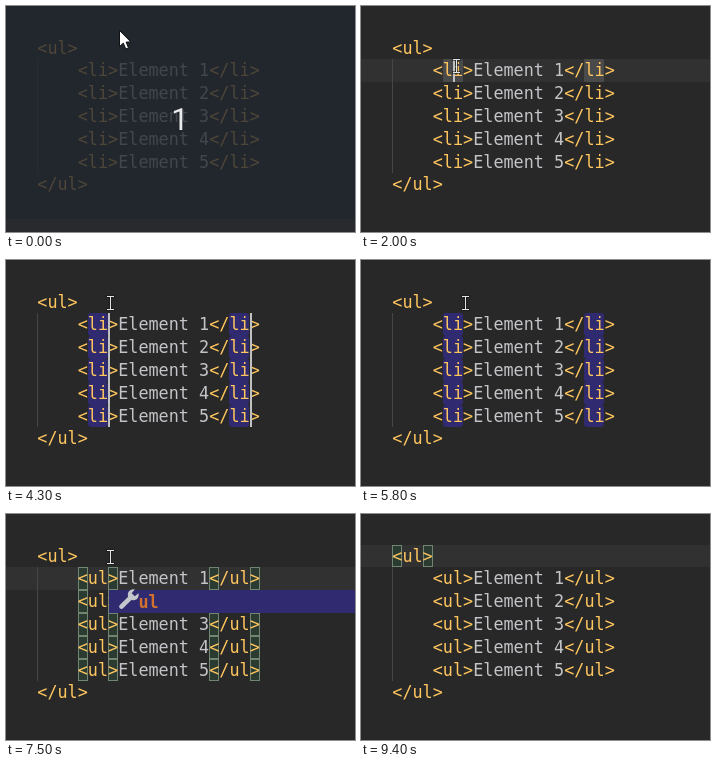
These frames come from a looping animation (349x226 px, 9700 ms). An HTML page with a canvas:

```html
<!DOCTYPE html>
<html>
<head>
<meta charset="utf-8">
<style>
html, body { margin: 0; height: 100%; overflow: hidden; background: #282828; }
canvas { display: block; }
</style>
</head>
<body>
<canvas id="stage" width="349" height="226"></canvas>
<script>
const ctx = document.getElementById('stage').getContext('2d');
const LOOP = 9700, W = 349, H = 226;
const FONT = '16.8px "DejaVu Sans Mono", monospace';
const TAG = '#ffc65f', PLAIN = '#c3c4c8', SELECTION = '#302b70';
const ITEMS = [1, 2, 3, 4, 5];

const colX = col => 31.3 + col * 10.114;
const rowY = row => Math.round(30.6 + row * 22.8);
const rowH = row => rowY(row + 1) - rowY(row);

// Mouse path: time, x, y
const PATH = [
  [0, 115.5, 28.5], [300, 115.5, 28.5], [400, 114.5, 28.5], [500, 114.5, 28.5],
  [900, 106, 45], [1000, 106, 45], [1100, 100.5, 50], [1200, 97.5, 58],
  [1300, 97.5, 61.5], [1400, 99.5, 57.5], [1500, 99.5, 57.5], [1600, 94.5, 62.5],
  [1900, 94.5, 62.5], [2700, 104.5, 43.5], [8100, 104.5, 43.5], [8200, 104.5, 42.5],
  [8300, 104.5, 43.5], [9000, 104.5, 43.5], [9300, 104.5, 16.5]
];

function mouseAt(t) {
  const i = PATH.findIndex(p => p[0] > t);
  if (i < 0) return PATH[PATH.length - 1].slice(1);
  const [t0, x0, y0] = PATH[i - 1], [t1, x1, y1] = PATH[i];
  const k = (t - t0) / (t1 - t0);
  return [x0 + (x1 - x0) * k, y0 + (y1 - y0) * k];
}

function rect(x, y, w, h, color) {
  ctx.fillStyle = color;
  ctx.fillRect(x, y, w, h);
}

function write(text, col, row, color) {
  ctx.font = FONT;
  ctx.fillStyle = color;
  ctx.fillText(text, colX(col), Math.round(47.6 + row * 22.8));
}

function mark(col, row, count, color, radius) {
  ctx.fillStyle = color;
  ctx.beginPath();
  ctx.roundRect(Math.round(colX(col)), rowY(row), Math.round(count * 10.114), rowH(row), radius);
  ctx.fill();
}

function brace(col, row) {
  const x = Math.round(colX(col)), y = rowY(row);
  rect(x, y, 10, rowH(row), '#2c3b32');
  ctx.strokeStyle = '#708671';
  ctx.lineWidth = 1;
  ctx.strokeRect(x + 0.5, y + 0.5, 9, rowH(row) - 1);
}

function caret(col, row) {
  rect(Math.round(colX(col)), rowY(row), 2, rowH(row), '#bfc0c2');
}

function wrench(x, y) {
  ctx.save();
  ctx.translate(x, y);
  ctx.rotate(Math.PI / 4);
  ctx.fillStyle = '#c4c8cc';
  ctx.beginPath();
  ctx.arc(0, -6, 5.5, -Math.PI / 2 + 0.5, Math.PI * 1.5 - 0.5);
  ctx.lineTo(-2.2, -6);
  ctx.lineTo(2.2, -6);
  ctx.fill();
  ctx.beginPath();
  ctx.roundRect(-2.3, -3, 4.6, 16, 2.3);
  ctx.fill();
  ctx.restore();
}

function option(text, typed, row) {
  wrench(123, rowY(row) + 9);
  ctx.font = 'bold ' + FONT;
  [...text].forEach((ch, i) => {
    ctx.fillStyle = i < typed ? '#d2702c' : PLAIN;
    ctx.fillText(ch, 132.5 + i * 10.114, rowY(row) + 18);
  });
}

function popup(t) {
  const x = 103, w = W - x;
  rect(x, rowY(2), w, rowH(2), SELECTION);
  if (t < 7200) {
    rect(x, rowY(3), w, rowH(3), '#3c3f41');
    option('u', 1, 2);
    option('ul', 1, 3);
  } else {
    option('ul', 2, 2);
  }
}

function beam(x, y) {
  x = Math.round(x - 0.5);
  y = Math.round(y - 0.5);
  const shape = (pad, color) => {
    rect(x - 3 - pad, y - 7 - pad, 7 + 2 * pad, 1 + 2 * pad, color);
    rect(x - 3 - pad, y + 6 - pad, 7 + 2 * pad, 1 + 2 * pad, color);
    rect(x - pad, y - 7, 1 + 2 * pad, 14, color);
  };
  shape(1, 'rgba(20,20,20,.5)');
  shape(0, '#e4e4e4');
}

function arrow(x, y) {
  const points = [[0, 0], [0, 16], [3.8, 12.6], [6.3, 18.5], [9, 17.3], [6.6, 11.6], [11.3, 11.4]];
  ctx.beginPath();
  points.forEach(([px, py]) => ctx.lineTo(x + px, y + py));
  ctx.closePath();
  ctx.fillStyle = '#fff';
  ctx.strokeStyle = '#111';
  ctx.lineWidth = 1;
  ctx.fill();
  ctx.stroke();
}

function countdown() {
  rect(0, 0, W, rowY(8), 'rgba(33,38,47,.8)');
  rect(0, rowY(8), W, H, '#292a2d');
  ctx.font = '31px Roboto, sans-serif';
  ctx.textAlign = 'center';
  ctx.fillStyle = '#e8eaec';
  ctx.fillText('1', 174, 124);
  ctx.textAlign = 'left';
}

function caretOn(t) {
  if (t < 1900) return false;
  if (t < 4300) return (t - 1900) % 1000 < 500;
  if (t < 6400) return (t - 4300) % 1000 < 500;
  if (t < 7800) return t < 7500;
  return t < 8500 || (t >= 8800 && t < 9300);
}

function draw(t) {
  const editing = t >= 6400 && t < 7800;
  const selecting = t >= 4300 && t < 6400;
  const name = t < 6400 ? 'li' : t < 6700 ? '' : t < 7000 ? 'u' : 'ul';
  const n = name.length, close = n + 15, end = close + n;
  const color = t >= 6400 && t < 6800 ? PLAIN : TAG;
  const activeRow = t < 1900 ? 8 : t < 7800 ? 1 : 0;

  rect(0, 0, W, H, '#282828');
  if (!selecting) rect(0, rowY(activeRow), W, rowH(activeRow), '#313131');
  rect(31, rowY(1), 1, rowY(6) - rowY(1), '#464646');

  if (t >= 7800) [0, 3].forEach(col => brace(col, 0));
  write('<ul>', 0, 0, TAG);
  write('</ul>', 0, 6, TAG);

  for (const row of ITEMS) {
    if (selecting) [5, 19].forEach(col => mark(col, row, 2, SELECTION, 3));
    else if (row === 1 && t >= 1900 && t < 4300) [5, 19].forEach(col => mark(col, row, 2, '#4a4a4a', 1));
    if (editing) [4, 5 + n, 13 + n + 2, end + 2].forEach(col => brace(col, row));
    const tail = editing || t >= 6400 ? n + 15 : 17;
    write('<' + name + '>', 4, row, color);
    write('Element ' + row, n + 6, row, PLAIN);
    write('</' + name + '>', tail, row, color);
  }

  if (caretOn(t)) {
    if (t < 4300) caret(6, 1);
    else if (t < 7800) ITEMS.forEach(row => [5 + n, end + 2].forEach(col => caret(col, row)));
    else caret(4, 0);
  }
  if (t >= 6800 && t < 7800) popup(t);

  if (t < 200) {
    countdown();
    arrow(113.5, 24.5);
  } else if (t < 9400) {
    beam(...mouseAt(t));
  }
}

function frame(now) {
  draw(Math.floor(now % LOOP / 100) * 100);
  requestAnimationFrame(frame);
}
requestAnimationFrame(frame);
</script>
</body>
</html>
```
